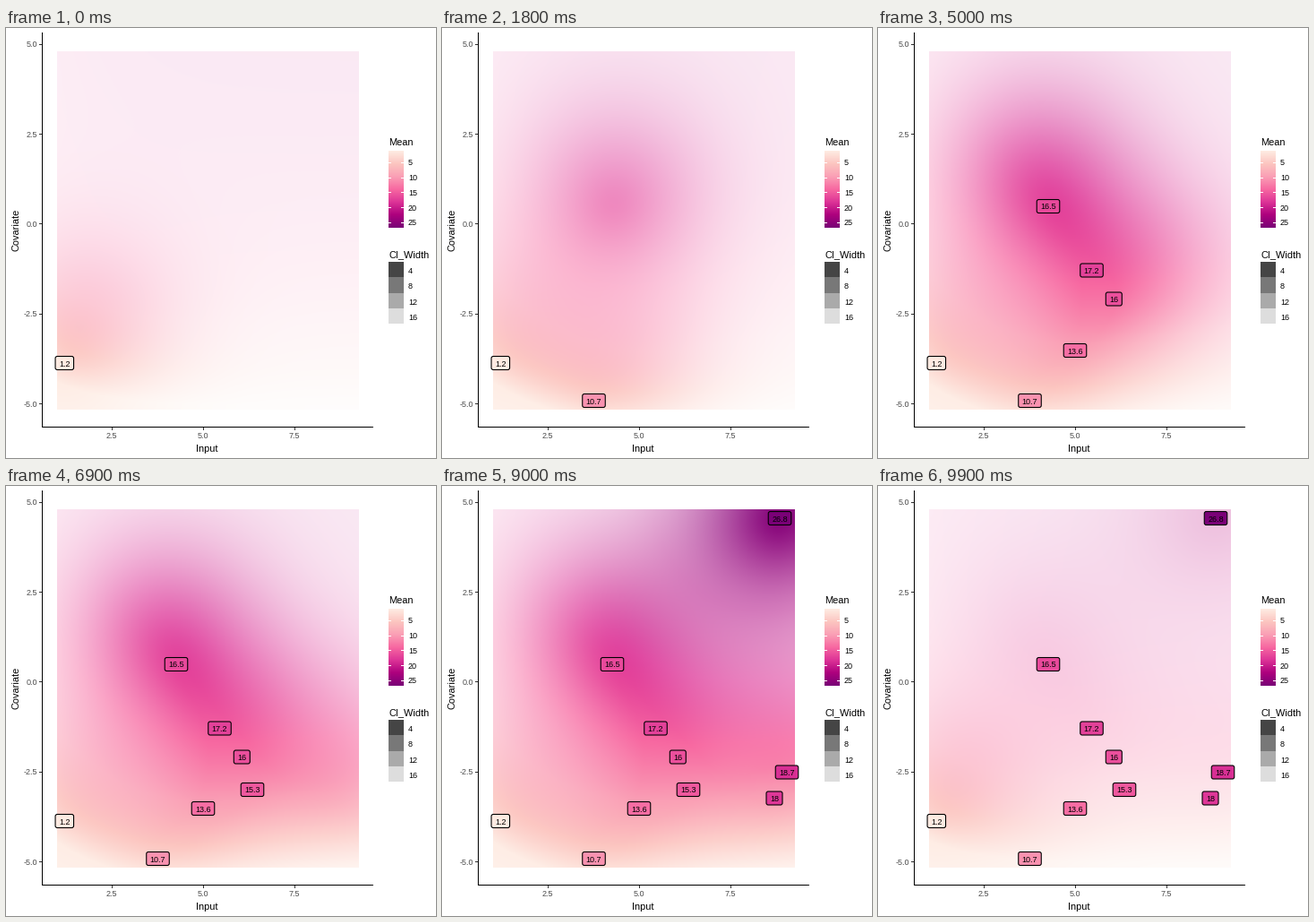
Animation of 480x480 px, one loop 10 s. Source, as a matplotlib script:

```python
import numpy as np
import matplotlib.pyplot as plt
from matplotlib.animation import FuncAnimation
from matplotlib.colors import LinearSegmentedColormap
from matplotlib.patches import FancyBboxPatch, Rectangle

SIZE = 480
PX = 0.72  # points per pixel at 100 dpi
LEFT, RIGHT, TOP, BOTTOM = 57, 394, 26, 426
LOW, HIGH = 1.2, 26.8
STEPS = 10   # frames per state
HOLD = 5     # last still frame of a state
LENGTH = 122  # kernel length scale in pixels
NOISE = 0.03

plt.rcParams["font.family"] = "Liberation Sans"

CMAP = LinearSegmentedColormap.from_list("pinks", [
    "#FEEBE2", "#FCC5C0", "#FA9FB5", "#F768A1",
    "#DD3497", "#AE017E", "#7A0177"], N=1024)

# observed value, centre x, centre y, shift of the mean surface there
POINTS = [
    (1.2, 65.3, 374, 0.0),
    (10.7, 169.5, 416, 2.5),
    (16.5, 190, 199, 1.4),
    (13.6, 220, 360, 1.6),
    (17.2, 238.5, 270.5, 1.8),
    (16, 263.3, 302.5, 1.5),
    (15.3, 275, 339, 1.4),
    (18, 371, 348.5, 1.0),
    (26.8, 377, 36, 6.8),
    (18.7, 385, 319.5, 1.0),
]


def to_px(x=0.0, y=0.0):
    return 118 + (x - 2.5) * 40.72, 218.5 - y * 40.15


def color(value):
    return CMAP((value - LOW) / (HIGH - LOW))


def kernel(ax_, ay, bx, by):
    d2 = (ax_[:, None] - bx) ** 2 + (ay[:, None] - by) ** 2
    return np.exp(-0.5 * d2 / LENGTH ** 2)


def surfaces():
    """Fill colour and opacity of the predicted surface for every state."""
    gx, gy = np.meshgrid(np.arange(LEFT, RIGHT) + 0.5,
                         np.arange(TOP, BOTTOM) + 0.5)
    shape = gx.shape
    gx, gy = gx.ravel(), gy.ravel()
    x = (gx - 118) / 40.72 + 2.5
    y = (218.5 - gy) / 40.15
    prior = 1.5 + 19.6 * (1 - np.exp(-(y + 5) / 4)) - 3 * np.exp((1 - x) / 1.5)

    _, px, py, shift = np.array(POINTS).T
    cross = kernel(gx, gy, px, py)
    gram = kernel(px, py, px, py) + NOISE * np.eye(len(px))
    fills, alphas = [], []
    for n in range(1, len(POINTS) + 1):
        inv = np.linalg.inv(gram[:n, :n])
        c = cross[:, :n]
        weights = c @ inv
        mean = prior + weights @ shift[:n]
        width = np.sqrt(np.clip(1 - np.sum(weights * c, axis=1), 0, 1))
        alpha = np.clip(1 - 0.9 * (width - 0.15) / 0.85, 0.1, 1)
        fills.append(color(mean)[:, :3].reshape(*shape, 3).astype("float32"))
        alphas.append(alpha.reshape(*shape, 1).astype("float32"))
    return fills, alphas


fig = plt.figure(figsize=(SIZE / 100, SIZE / 100), dpi=100, facecolor="white")
ax = fig.add_axes([0, 0, 1, 1])
ax.set_xlim(0, SIZE)
ax.set_ylim(SIZE, 0)
ax.axis("off")


def write(x, base, text, size=9, **style):
    return ax.text(x, base, text, fontsize=size * PX, va="baseline", **style)


def box(x, y, w, h, fill, z=2):
    ax.add_patch(Rectangle((x, y), w, h, fc=fill, lw=0, zorder=z))


def draw_axes():
    box(40, 5, 1, 441, "black")
    box(40, 445, 370, 1, "black")
    for value in (2.5, 5.0, 7.5):
        px = to_px(x=value)[0]
        box(round(px) - 0.5, 446, 1, 3, "#333333")
        write(px, 458.5, f"{value:.1f}", color="#4D4D4D", ha="center")
    for value in (-5.0, -2.5, 0.0, 2.5, 5.0):
        py = to_px(y=value)[1]
        box(37, round(py) - 0.5, 3, 1, "#333333")
        write(35, py + 3.5, f"{value:.1f}", color="#4D4D4D", ha="right")
    write(224.5, 473, "Input", 11, ha="center")
    write(15, 225.5, "Covariate", 11, ha="center", rotation=90,
          rotation_mode="anchor")


def draw_legends():
    write(427, 131, "Mean", 11)
    bar = color(np.linspace(LOW, HIGH, 86))[:, None, :]
    ax.imshow(bar, extent=(427, 444, 223, 137), aspect="auto",
              interpolation="nearest", zorder=1)
    for value in range(5, 26, 5):
        py = 137 + 86 * (value - LOW) / (HIGH - LOW)
        for x in (427, 440.6):
            box(x, round(py) - 0.5, 3.4, 1, "white")
        write(449, py + 3.5, str(value))

    write(427, 256, "CI_Width", 11)
    for i, shade in enumerate(("#454545", "#787878", "#AAAAAA", "#DDDDDD")):
        py = 261 + 17.28 * i
        box(427, py, 17, 17.28, shade)
        write(449, py + 13, str(4 * (i + 1)))


def make_label(value, x, y):
    text = f"{value:g}"
    width = 8 + 9 * sum(0.278 if ch == "." else 0.556 for ch in text)
    patch = FancyBboxPatch((x - width / 2, y - 7.5), width, 15,
                           boxstyle="round,pad=0,rounding_size=2.2",
                           fc=color(value), ec="black", lw=1.1 * PX, zorder=4)
    ax.add_patch(patch)
    return patch, write(x, y + 3.5, text, ha="center", zorder=5)


draw_axes()
draw_legends()
fills, alphas = surfaces()
labels = [make_label(v, x, y) for v, x, y, _ in POINTS]
surface = ax.imshow(fills[0], extent=(LEFT, RIGHT, BOTTOM, TOP), aspect="auto",
                    interpolation="nearest", zorder=1)
ax.set_xlim(0, SIZE)
ax.set_ylim(SIZE, 0)


def draw(frame):
    state, step = divmod(frame, STEPS)
    after = (state + 1) % len(POINTS)
    t = max(0, step - HOLD) / (STEPS - HOLD)
    fill = (1 - t) * fills[state] + t * fills[after]
    alpha = (1 - t) * alphas[state] + t * alphas[after]
    surface.set_data(np.clip(1 - alpha * (1 - fill), 0, 1))
    for i, parts in enumerate(labels):
        for part in parts:
            part.set_visible(i <= state)
    return [surface]


anim = FuncAnimation(fig, draw, frames=STEPS * len(POINTS), interval=100,
                     init_func=lambda: draw(0), repeat=True)
plt.show()
```
